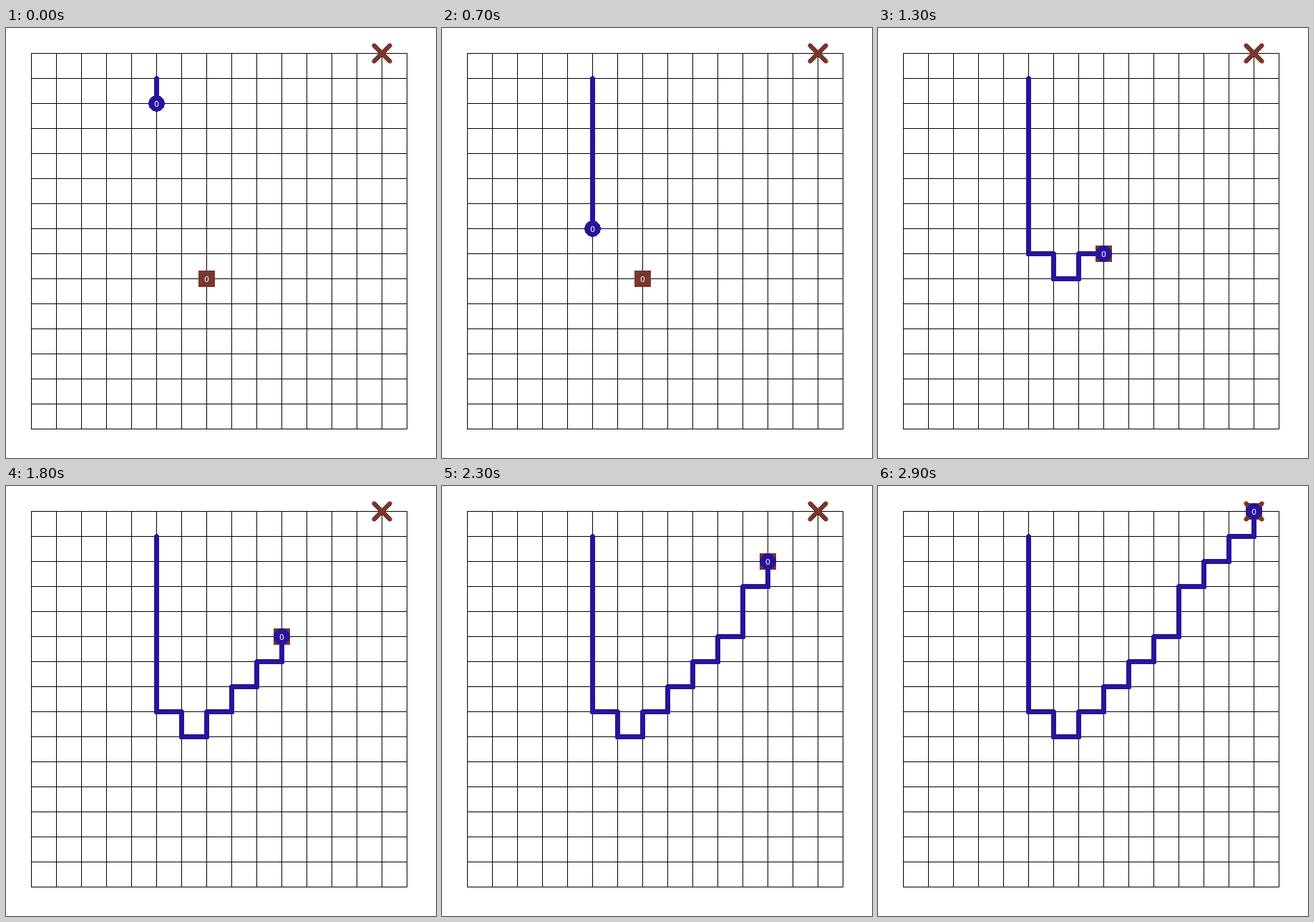
An HTML page for the animation above (3000 ms loop, 601 by 601 pixels).

```html
<!DOCTYPE html>
<html lang="en">
<head>
<meta charset="utf-8">
<title>Grid courier</title>
<style>
  html, body { margin: 0; width: 100%; height: 100%; overflow: hidden; background: #fff; }
  svg { display: block; width: 601px; height: 601px; }
  .grid { stroke: #000; stroke-width: 1; }
  .goal { stroke: #78372d; stroke-width: 6; stroke-linecap: round; }
  .trail { fill: none; stroke: #28149b; stroke-width: 7; stroke-linecap: round; stroke-linejoin: round; }
  .parcel { fill: #78372d; }
  .robot { fill: #28149b; }
  text { fill: #fff; font: 11px "DejaVu Sans", sans-serif; text-anchor: middle; }
</style>
</head>
<body>
<svg viewBox="0 0 601 601" shape-rendering="crispEdges">
  <path class="grid" id="grid"/>
  <path class="goal" d="M514.5 24.5l22 22m0-22l-22 22"/>
  <polyline class="trail" id="trail"/>
  <g id="parcel">
    <rect class="parcel" x="-11.5" y="-11.5" width="23" height="23"/>
    <text y="4">0</text>
  </g>
  <g id="robot">
    <circle class="robot" r="11.3"/>
    <text y="4">0</text>
  </g>
</svg>
<script>
  const CELL = 35, LINES = 16, STEP = 100, PICKUP = 11;
  const MOVES = 'DDDDDUDDRDRURURURURUURUDURURU';
  const DIRS = { U: [0, -1], D: [0, 1], R: [1, 0] };
  const $ = id => document.getElementById(id);
  const at = n => CELL * (n + 1) + 0.5;

  // Grid positions, one per step; the trail begins one cell above the first.
  const stops = [[5, 2]];
  for (const m of MOVES) {
    const [x, y] = stops[stops.length - 1];
    stops.push([x + DIRS[m][0], y + DIRS[m][1]]);
  }
  const trailStart = [5, 1];

  let grid = '';
  for (let i = 0; i < LINES; i++) {
    grid += `M${at(i)} 35V561M35 ${at(i)}H561`;
  }
  $('grid').setAttribute('d', grid);

  // Column and row 0 lie on the first grid line.
  const place = (id, [x, y]) =>
    $(id).setAttribute('transform', `translate(${at(x)} ${at(y)})`);

  function draw(step) {
    const path = [trailStart, ...stops.slice(0, step + 1)];
    $('trail').setAttribute('points', path.map(p => p.map(at).join()).join(' '));
    place('robot', stops[step]);
    place('parcel', stops[Math.max(step, PICKUP)]);
  }

  let shown = 0, start;
  draw(0);
  function tick(now) {
    start ??= now;
    const step = Math.floor((now - start) / STEP) % stops.length;
    if (step !== shown) draw(shown = step);
    requestAnimationFrame(tick);
  }
  requestAnimationFrame(tick);
</script>
</body>
</html>
```
